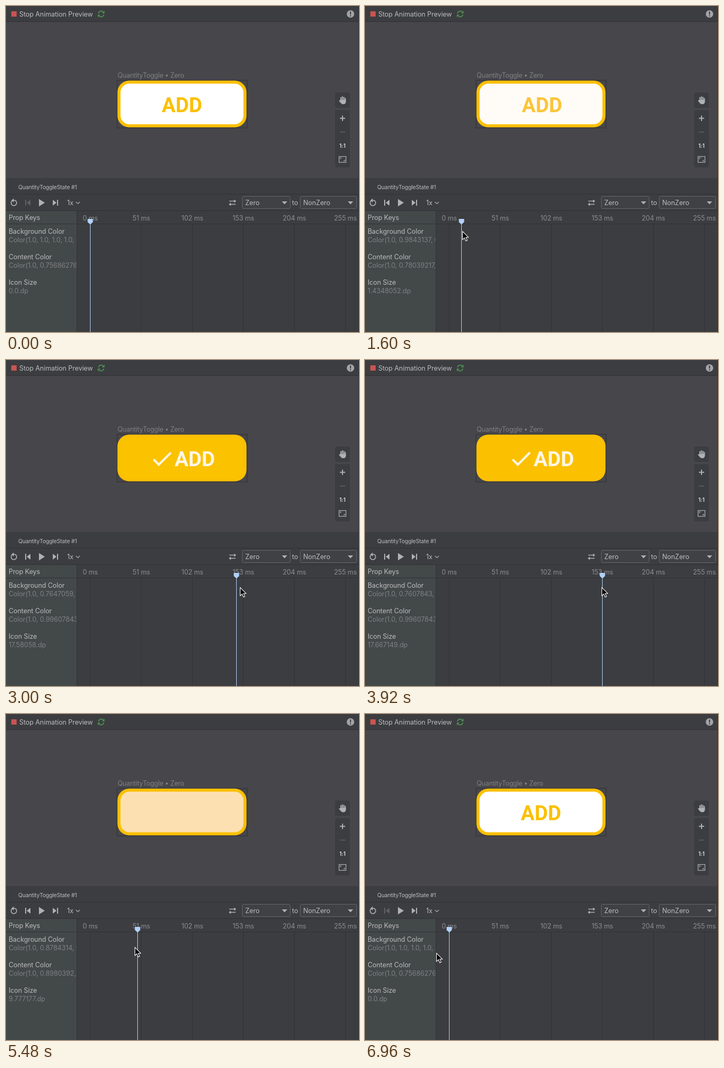
Recreate the animation shown at these times as an HTML page. Size 664 by 614 pixels, loop 7 s.

```html
<!DOCTYPE html>
<html lang="en">
<head>
<meta charset="utf-8">
<title>Animation preview</title>
<style>
  html, body { margin: 0; width: 100%; height: 100%; overflow: hidden; background: #3c3d40; }
  svg { display: block; }
  text { font: 12.5px Inter, "Open Sans", sans-serif; letter-spacing: -.07px; fill: #bbbcbd; }
  .dim { fill: #7f8183; }
  .tick { fill: #8b8d90; text-anchor: middle; letter-spacing: -.12px; }
  .small { font-size: 10.5px; letter-spacing: -.2px; }
  .ratio { font-size: 10px; font-weight: 700; text-anchor: middle; fill: #cfd0d1; }
  .label { font: 700 38.5px Roboto, "Open Sans", sans-serif; letter-spacing: 0; text-anchor: middle; fill: inherit; }
  .line { fill: none; stroke: #afb1b3; stroke-width: 1.6; }
  .icon { fill: #afb1b3; }
  .rule { fill: none; stroke: #313235; }
  .box { fill: #3f4144; stroke: #646669; }
</style>
</head>
<body>
<svg width="664" height="614" viewBox="0 0 664 614">
  <defs>
    <clipPath id="column"><rect y="386" width="132.500" height="228"/></clipPath>
  </defs>

  <rect width="664" height="614" fill="#3c3d40"/>
  <rect y="30" width="664" height="294" fill="#47464b"/>
  <rect y="386" width="133" height="228" fill="#434849"/>
  <path class="rule" d="M0 29.500H664M0 354.500H664M0 385.500H664M0 410.500H664M133.500 386V614M663.500 0V614"/>

  <!-- top bar -->
  <rect x="10" y="10" width="10" height="10" fill="#c75450"/>
  <text x="25" y="20">Stop Animation Preview</text>
  <g fill="none" stroke="#4f9e55" stroke-width="1.500">
    <path d="M174 14a5.200 5.200 0 0 1 9.200-2.600M184 16a5.200 5.200 0 0 1-9.200 2.600"/>
    <path d="M184.500 9.500V13H181M173.500 20.500V17H177"/>
  </g>
  <circle cx="648" cy="15" r="7" fill="#a2a4a6"/>
  <path d="M648 10.500V16M648 17.500V19.500" stroke="#3c3d40" stroke-width="2"/>

  <!-- preview -->
  <text class="dim" x="210" y="135" style="letter-spacing:-.28px">QuantityToggle • Zero</text>
  <rect x="209" y="140" width="244.500" height="89.500" fill="none" stroke="#3a3a3e" stroke-width="2"/>
  <rect x="209.600" y="140.500" width="242.800" height="88" rx="22" fill="#fbc002"/>
  <rect id="face" x="215.400" y="146.300" width="231.200" height="76.400" rx="16.500"/>
  <g id="content">
    <path id="check" d="M9 16.170L4.830 12l-1.420 1.410L9 19 21 7l-1.410-1.410z"/>
    <text id="add" class="label" y="199.700">ADD</text>
  </g>

  <!-- zoom tools -->
  <g fill="#3c3d40">
    <rect x="619" y="163" width="28" height="29" rx="4"/>
    <rect x="619" y="196" width="28" height="108" rx="4"/>
  </g>
  <g fill="none" stroke="#afb1b3" stroke-linecap="round" stroke-width="2">
    <path d="M630 179V172.500M632.800 178V171M635.600 178V172M638.300 180V174M627.500 178.500L631 182"/>
  </g>
  <path class="icon" d="M629 177H639.300V180.500Q639 185 634 185 631.500 185 630 183L626.500 178.500Z"/>
  <path class="line" d="M628 211.500H638M633 206.500V216.500" style="stroke-width:2"/>
  <path d="M628 237.500H638" stroke="#606164" stroke-width="1.500"/>
  <text class="ratio" x="633" y="267">1:1</text>
  <rect class="line" x="626.500" y="283.500" width="13" height="11" style="stroke-width:1.200"/>
  <path class="line" d="M629 288.500V286H631.500M637 289.500V292H634.500" style="stroke-width:1.200"/>

  <!-- player bar -->
  <text class="small" x="23" y="345">QuantityToggleState #1</text>
  <path class="line" d="M11 367.200A5.200 5.200 0 1 0 17.500 366.300H12"/>
  <path class="icon" d="M14.500 362.500V370L10 366.300Z"/>
  <path id="prev" d="M36 365h2v11h-2zM46 365v11l-7-5.500z"/>
  <path class="icon" d="M62 363.500v14l11-7zM88 365v11l7-5.500zM96 365h2v11h-2z"/>
  <text x="115" y="375">1x</text>
  <path class="line" d="M131.500 369l3.700 3.500 3.700-3.500" style="stroke-width:1.200"/>
  <path class="line" d="M420 367.500H430M422 373.500H432" style="stroke-width:1.500"/>
  <path class="icon" d="M429 364.500l4 3-4 3zM423 370.500l-4 3 4 3z"/>
  <rect class="box" x="444.500" y="358.500" width="90" height="23" rx="2"/>
  <rect class="box" x="553.500" y="358.500" width="106" height="23" rx="2"/>
  <path class="icon" d="M519 368h10l-5 5.500zM643 368h10l-5 5.500z"/>
  <text x="450" y="375">Zero</text>
  <text x="538" y="375">to</text>
  <text x="559" y="375">NonZero</text>

  <!-- timeline -->
  <text x="5" y="403">Prop Keys</text>
  <g id="ticks"></g>
  <g clip-path="url(#column)">
    <text x="5" y="429">Background Color</text>
    <text id="backValue" class="dim" x="5" y="445"></text>
    <text x="5" y="477">Content Color</text>
    <text id="contentValue" class="dim" x="5" y="493"></text>
    <text x="5" y="525">Icon Size</text>
    <text id="sizeValue" class="dim" x="5" y="541"></text>
  </g>
  <g id="playhead" fill="#b2d0fb">
    <path d="M-4.500 401H5.500V407L.5 411.500-4.500 407Z"/>
    <rect y="410" width="1" height="204"/>
  </g>
  <path id="cursor" d="M0 0V15.500L3.600 12.200 6.200 18 8.800 16.900 6.300 11.200H11Z" fill="#000" stroke="#fff" stroke-width="1.100"/>
</svg>

<script>
const $ = id => document.getElementById(id);
const LOOP = 7000, STEP = 40;
const START_X = 158, PX_PER_MS = 1.887, PX_PER_DP = 2.75;
const CENTER_X = 331, CENTER_Y = 185.8, LABEL_HALF = 37.5;
const OMEGA = Math.sqrt(1500);

const toLinear = v => (v /= 255) <= .04045 ? v / 12.92 : ((v + .055) / 1.055) ** 2.4;
const toSrgb = v => Math.round(255 * (v <= .0031308 ? Math.max(0, v) * 12.92 : 1.055 * v ** (1 / 2.4) - .055));
const linear = (...rgb) => rgb.map(toLinear);
const mix = (a, b, f) => a.map((v, i) => toSrgb(v + (b[i] - v) * f));

// Values in the property list, and how the display shows them
const WHITE = linear(255, 255, 255), AMBER = linear(255, 193, 7);
const SHOWN_AMBER = [...linear(251, 192), -.025];  // blue lies outside the display gamut
const SHOWN_CREAM = linear(254, 247, 232);

// [time, x] for the playhead and [time, x, y] for the pointer
const headKeys = [[1400, 158], [1600, 181], [2400, 323], [3160, 462], [3360, 472],
  [3440, 472], [3920, 446], [4840, 335], [5480, 247], [6160, 158]];
const pointerKeys = [[40, 352, 612], [700, 170, 424], [1040, 158, 410], [1400, 158, 410],
  [1600, 183, 424], [2400, 330, 429], [3160, 469, 428], [3360, 474, 427], [3440, 474, 427],
  [3920, 445, 428], [4840, 332, 438], [5480, 242, 439], [6160, 150, 446], [6520, 134, 450]];

function sample(keys, t) {
  const i = keys.findIndex(k => k[0] > t);
  if (i < 0) return keys[keys.length - 1].slice(1);
  if (i === 0) return keys[0].slice(1);
  const a = keys[i - 1], b = keys[i];
  const f = (t - a[0]) / (b[0] - a[0]);
  return a.slice(1).map((v, n) => v + (b[n + 1] - v) * f);
}

// Critically damped spring from 0 to 1
const spring = ms => {
  const wt = OMEGA * ms / 1000;
  return 1 - (1 + wt) * Math.exp(-wt);
};

// Shortest decimal that identifies a 32-bit float
function floatText(value) {
  const target = Math.fround(value);
  for (let digits = 1; digits < 10; digits++) {
    const short = Number(target.toPrecision(digits));
    if (Math.fround(short) === target) return Number.isInteger(short) ? short + ".0" : String(short);
  }
  return String(target);
}
const colorText = rgb => `Color(${rgb.map(v => floatText(v / 255)).join(", ")}, 1.0, sRGB)`;
const css = rgb => `rgb(${rgb})`;

$("ticks").innerHTML = [0, 51, 102, 153, 204, 255].map(ms => {
  const x = Math.floor(START_X + ms * 1.884);
  return `<path class="rule" d="M${x + .5} 411V614"/><text class="tick" x="${x + .5}" y="404">${ms} ms</text>`;
}).join("");

function draw(t) {
  const headX = Math.round(sample(headKeys, t)[0]);
  const ms = Math.round((headX - START_X) / PX_PER_MS);
  const f = spring(ms), dp = 18 * f, size = dp * PX_PER_DP;

  $("playhead").setAttribute("transform", `translate(${headX})`);
  $("prev").setAttribute("fill", ms ? "#afb1b3" : "#5f6163");
  $("face").setAttribute("fill", css(mix(WHITE, SHOWN_AMBER, f)));
  $("content").setAttribute("fill", css(mix(SHOWN_AMBER, SHOWN_CREAM, f)));
  $("add").setAttribute("x", CENTER_X + size / 2);
  $("check").setAttribute("transform",
    `translate(${CENTER_X - LABEL_HALF - size / 2} ${CENTER_Y - size / 2}) scale(${size / 24})`);

  $("backValue").textContent = colorText(mix(WHITE, AMBER, f));
  $("contentValue").textContent = colorText(mix(AMBER, WHITE, f));
  $("sizeValue").textContent = floatText(dp) + ".dp";

  const [x, y] = sample(pointerKeys, t).map(Math.round);
  $("cursor").setAttribute("transform", `translate(${x + .5} ${y + .5})`);
  $("cursor").setAttribute("visibility", t < STEP ? "hidden" : "visible");
}

const origin = performance.now();
function tick() {
  const t = (performance.now() - origin) % LOOP;
  draw(Math.floor(t / STEP) * STEP);
  requestAnimationFrame(tick);
}
draw(0);
requestAnimationFrame(tick);
</script>
</body>
</html>
```
